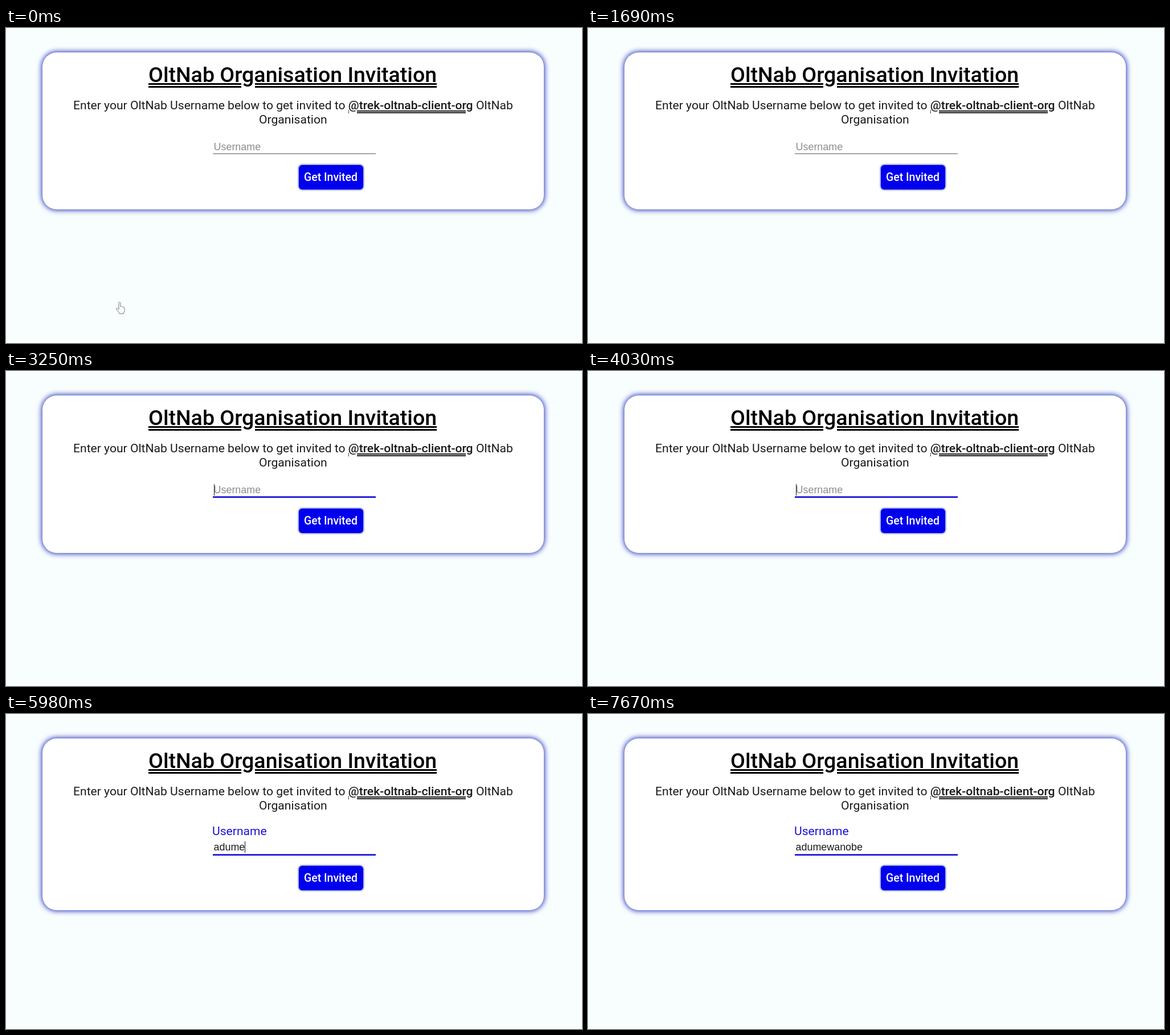
Write an HTML page that moves like this. It is 1011 px wide and 554 px high and loops after 8 s.

```html
<!DOCTYPE html>
<html lang="en">
<head>
<meta charset="utf-8">
<title>Organisation Invitation</title>
<style>
html, body { margin: 0; width: 100%; height: 100%; overflow: hidden; background: #f8fdfe; }
body { position: relative; font: 21.1px/25px Roboto, sans-serif; color: #1a1a1a; }
body > * { position: absolute; margin: 0; white-space: pre; }
#card { left: 64px; top: 43px; width: 880px; border-radius: 25px; background: #fff; box-shadow: 0 0 8px 2px #3e4cc3; }
h1 { left: 250px; top: 72px; font-size: 37.5px; line-height: 20px; font-weight: 500; color: #000; text-decoration: underline double; }
b { font-weight: 500; text-decoration: underline double; }
#label { left: 362px; top: 193px; color: #1b10d6; }
#field { left: 364.6px; font: 17.9px/20px "Liberation Sans", Arial, sans-serif; }
#caret { display: inline-block; width: 1px; height: 20px; margin-right: -1px; vertical-align: top; background: #111; }
#hint { color: #8c8c8c; }
#line { left: 363px; }
#button { left: 513.5px; width: 113px; height: 43px; border-radius: 6px; background: #00e; color: #fff;
  font-size: 19.5px; font-weight: 500; line-height: 23px; padding-top: 10px; box-sizing: border-box;
  text-align: center; box-shadow: 0 0 3px 1px #6a76d0; }
#hand { left: 192px; top: 481px; }
</style>
</head>
<body>
<div id="card"></div>
<h1>OltNab Organisation Invitation</h1>
<p style="left:118px;top:123px">Enter your OltNab Username below to get invited to <b>@trek-oltnab-client-org</b></p>
<p style="left:825px;top:123px">OltNab</p>
<p style="left:444px;top:148px">Organisation</p>
<div id="label">Username</div>
<div id="field"><span id="typed"></span><i id="caret"></i><span id="hint">Username</span></div>
<svg id="line" width="286" height="5"><rect id="rule" y=".4" width="286"/></svg>
<div id="button">Get Invited</div>
<svg id="hand" width="18" height="23" viewBox="0 0 18 23">
  <path d="M6 14V3q0-2 1.500-2T9 3v6q1.500-1.500 2.500 .5 1.500-1 2.500 .7 2-.5 2 1.800v4q0 2-1.500 4v1.500H7V20L2 14q-1-2 .5-2.300T6 14"
    fill="#fff" stroke="#778" stroke-linejoin="round"/>
</svg>
<script>
const $ = id => document.getElementById(id);
const LOOP = 8000, FOCUS = 1820, BLINK = 520;
const name = 'adumewanobe';
const keys = [4420, 4810, 5330, 5590, 5980, 6110, 6370, 6630, 6890, 7020, 7150];

function draw(t) {
  const count = keys.filter(k => k <= t).length;
  const focused = t >= FOCUS, filled = count > 0;
  const shift = filled ? 26 : focused ? 1 : 0;

  // The caret restarts its blink at focus and at every key
  const since = t - (filled ? keys[count - 1] : FOCUS);
  const caretOn = focused && Math.floor(since / BLINK) % 2 === 0;

  $('card').style.height = 276 + shift + 'px';
  $('button').style.top = 241 + shift + 'px';
  $('label').hidden = !filled;
  $('hint').hidden = filled;
  $('typed').textContent = name.slice(0, count);
  $('caret').style.opacity = +caretOn;
  $('field').style.top = (filled ? 224 : 199) + 'px';
  $('line').style.top = (filled ? 246 : 220) + 'px';
  $('rule').setAttribute('height', focused ? 2.6 : 1.4);
  $('rule').setAttribute('fill', focused ? '#1008d8' : '#808080');

  // The pointer glides to the input and vanishes there
  const u = Math.min(1, Math.max(0, (t - 260) / 650));
  const ease = u * u * (3 - 2 * u);
  $('hand').style.transform = `translate(${240 * ease}px, ${-270 * ease}px)`;
  $('hand').style.opacity = +(u < 1);
}

const start = performance.now();
function tick() {
  draw((performance.now() - start) % LOOP);
  requestAnimationFrame(tick);
}
tick();
</script>
</body>
</html>
```
